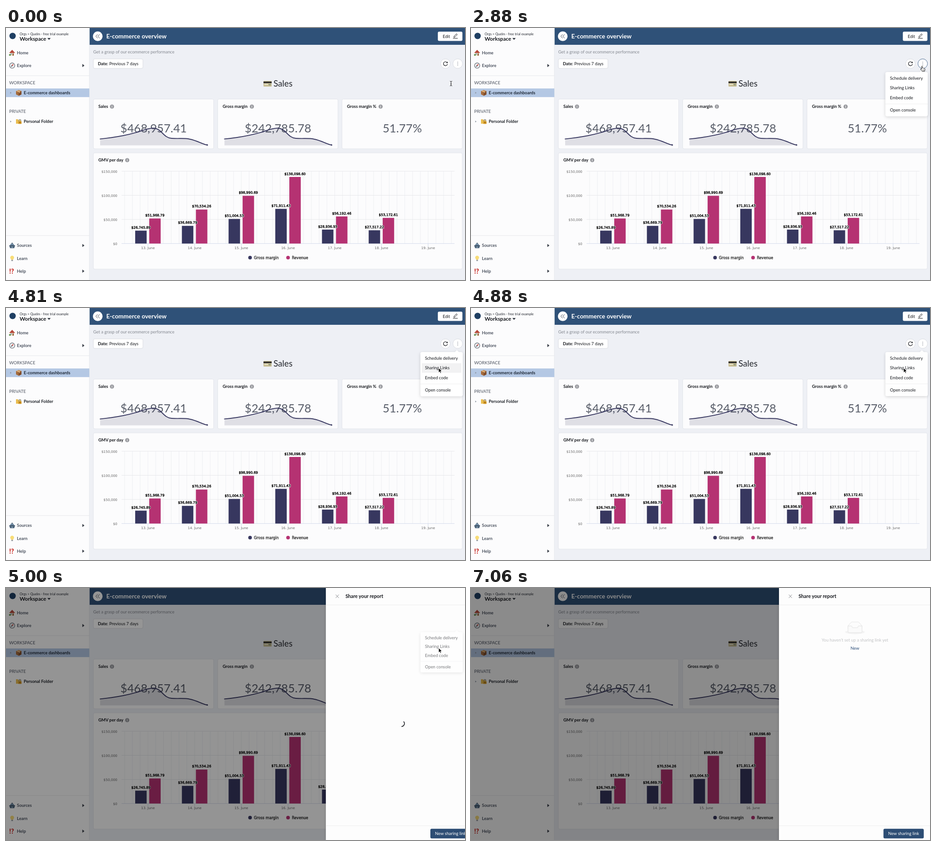
An HTML page that plays this animation: 1009x555 px, repeating every 7.12 s.

```html
<!DOCTYPE html>
<html lang="en">
<head>
<meta charset="utf-8">
<title>E-commerce overview</title>
<style>
html, body { margin: 0; width: 100%; height: 100%; overflow: hidden; background: #eef0f5; }
svg { display: block; width: 100vw; height: 100vh; font-family: Lato, sans-serif; }
.chart { font-family: "DejaVu Sans", sans-serif; }
</style>
</head>
<body>
<svg id="stage" viewBox="0 0 1009 555" preserveAspectRatio="none"></svg>
<script>
const LOOP = 7120;
const NAVY = '#37375f', PINK = '#b53272', BLUE = '#2f5178', INK = '#16181d';
const stage = document.getElementById('stage');

// ---- markup helpers ----
const rect = (x, y, w, h, fill, more = '') =>
  `<rect x="${x}" y="${y}" width="${w}" height="${h}" fill="${fill}" ${more}/>`;
const circle = (x, y, r, fill, more = '') =>
  `<circle cx="${x}" cy="${y}" r="${r}" fill="${fill}" ${more}/>`;
const path = (d, fill, more = '') => `<path d="${d}" fill="${fill}" ${more}/>`;
const line = (d, color, w = 1, more = '') =>
  `<path d="${d}" fill="none" stroke="${color}" stroke-width="${w}" ${more}/>`;
const text = (x, y, s, size = 9.38, fill = INK, more = '') =>
  `<text x="${x}" y="${y}" font-size="${size}" fill="${fill}" ${more}>${s}</text>`;
const group = (inner, more = '') => `<g ${more}>${inner}</g>`;
const BOLD = 'font-weight="700"';
const MID = 'text-anchor="middle"';
const ROUND = 'stroke-linecap="round" stroke-linejoin="round"';

const info = (x, y) => circle(x, y, 4.6, '#9a9ba0') +
  rect(x - .55, y - .8, 1.1, 3.3, '#fff') + circle(x, y - 2.1, .7, '#fff');
const caret = (x, y) => path(`M${x} ${y - 3.6}l4.6 3.6l-4.6 3.6z`, '#3d424b');
const twig = (y) => path(`M9.3 ${y - 2}l2.8 2l-2.8 2z`, '#8c939e');

// ---- sidebar ----
function sidebar() {
  const soft = '#4b525f';
  const home = path('M9 54h9v7h-9z', '#efe0c4') + path('M7 55l6.5-7l6.5 7z', '#b5483a') +
    rect(14.5, 56, 2.4, 5, '#8a5a3a') + rect(10.2, 56, 2.6, 2.4, '#6f9cc0') + circle(8.6, 59.3, 2, '#5d8f4a');
  const compass = circle(13.5, 82.7, 5.8, '#eef0f2', 'stroke="#5f666e" stroke-width="1.2"') +
    path('M17 79l-2.4 4.8l-2.2-2.2z', '#d0493e') + path('M10 86.4l2.4-4.8l2.2 2.2z', '#6a747e');
  const box = path('M22 139l6-2.6l6 2.6v7.2l-6 3l-6-3z', '#a46a3c') +
    path('M22 139l6-2.6l6 2.6l-6 2.8z', '#cf9a62') + path('M28 141.8l6-2.8v7.2l-6 3z', '#7f4c2a') +
    path('M24.6 137.9l6 2.8v2.4l-1.4-.6v-1.2l-6-2.8z', '#e5c79a');
  const lock = path('M22 201h4l1.2 1.4h5v8.4h-10.2z', '#e9bd50') +
    line('M28.4 206v-2.4a2.2 2.2 0 0 1 4.4 0v2.4', '#8b8f95', 1.2) + rect(27, 205.4, 7.2, 5.8, '#d59a28', 'rx="1"') +
    circle(30.6, 208, .9, '#604612');
  const pot = path('M7.5 480h12l-1.4 5h-9.2z', '#53697f') + path('M9 479a4.5 4.5 0 0 1 9 0z', '#6f8ca5') +
    circle(13.5, 474, 1.3, '#4d6072') + rect(7, 478.4, 13, 2.2, '#3e5267', 'rx="1"') + circle(13.5, 482.6, 1.2, '#a9cbe0');
  const bulb = circle(13.5, 505.6, 4.2, '#f7dc77') + path('M11.4 508.6h4.2v2.2h-4.2z', '#f1d27a') +
    rect(11.7, 510.8, 3.6, 2.4, '#8f959b', 'rx=".8"');
  return rect(0, 0, 183.5, 555, '#fcfcfd') + line('M183.2 0V555', '#dfe2e8', .8) +
    circle(14.5, 17.5, 7, '#1f3f63') +
    text(30, 15.6, 'Orgs &gt; Quelm - free trial example', 7.37, '#22262e') +
    text(30, 28, 'Workspace', 11.7, INK, BOLD) + path('M91 21.9h7.2l-3.6 4.4z', '#343a44') +
    home + text(24, 58.3, 'Home', 9.38, soft, BOLD) +
    compass + text(24, 86.4, 'Explore', 9.38, soft, BOLD) + caret(167.8, 82.7) +
    line('M0 105H183', '#e6e7ea') +
    text(7, 123.7, 'WORKSPACE', 9.38, soft) +
    rect(0, 133.2, 183.2, 19, '#b4c8e4') + twig(142.7) + box +
    text(39, 146, 'E-commerce dashboards', 9.38, '#1d2735', BOLD) +
    text(7, 186.9, 'PRIVATE', 9.38, soft) +
    twig(206) + lock + text(39, 209.2, 'Personal Folder', 9.38, '#1d2127', BOLD) +
    line('M0 457H183', '#e6e7ea') +
    pot + text(24, 482.4, 'Sources', 9.38, soft, BOLD) + caret(167.8, 479) +
    bulb + text(24, 510.6, 'Learn', 9.38, soft, BOLD) +
    text(7, 540.5, '!?', 14, '#c8322c', 'font-weight="900"') +
    text(24, 538.6, 'Help', 9.38, soft, BOLD) + caret(167.8, 535.5);
}

// ---- dashboard ----
const card = (x, y, w, h) => rect(x, y, w, h, '#fcfcfd', 'rx="3" stroke="#e0e3e9" stroke-width=".9"');

function kpi(x, title, infoX, value, trend) {
  const spark = 'M15 87.9C38 85.6 72 80 94 73.6C108 69.5 120 63.6 133 64C151 65.5 153 85 172 86.5C188 87.6 200 85.6 212 88.2C227 91 239 99 251 101.5';
  return card(x, 156.5, 264.5, 109.5) + text(x + 11, 176.2, title, 9.38, INK, BOLD) + info(infoX, 173) +
    text(x + 132.5, 229.6, value, 25.7, '#585d69', MID) +
    (trend ? group(path(spark + 'V102H15Z', NAVY, 'opacity=".15"') + line(spark, NAVY, 1.9, ROUND) +
      circle(250.2, 101, 1.4, NAVY), `transform="translate(${x} 156.5)"`) : '');
}

function chart() {
  const base = 474.7, day = 102.65, first = 312;
  const sales = [[26745.89, 51968.79], [36669.79, 70534.26], [51004.53, 98990.69],
    [71911.43, 138098.60], [28936.93, 56192.46], [27517.22, 53172.61]];
  const money = (v, digits) => '$' + v.toLocaleString('en-US', { minimumFractionDigits: digits });
  let grid = '', bars = '', labels = '';
  for (let i = 0; i < 43; i++) {
    const x = (first + (i - 3) * day / 6).toFixed(1);
    grid += line(`M${x} 315.5V${base}`, '#e9eaee', .7);
  }
  for (let i = 0; i < 4; i++) {
    const y = base - i * 53.1;
    grid += line(`M254 ${y}H986`, i ? '#e3e4e8' : '#c7d1e6', .8) +
      text(244.8, y + 3.2, money(i * 50000, 0), 7.37, '#666', 'text-anchor="end"');
  }
  for (let i = 0; i < 7; i++) {
    const x = first + i * day;
    grid += line(`M${x} ${base}v6.5`, '#c7d1e6', .8) + text(x, 487.4, `${13 + i}. June`, 7.37, '#666', MID);
    (sales[i] || []).forEach((v, k) => {
      const top = base - v * 159.3 / 150000, mid = x + (k ? 15.4 : -15.4);
      bars += rect(mid - 12.6, top, 25.2, base - top, k ? PINK : NAVY);
      const at = more => text(mid, top - 4.3, money(v, 2), 7.37, '#000', MID + more);
      labels += at(' stroke="#fff" stroke-width="2" stroke-linejoin="round"') + at(' stroke="#000" stroke-width=".45"');
    });
  }
  const heavy = 'stroke="#333" stroke-width=".45" letter-spacing=".1"';
  return card(192, 275, 811, 256) + text(203, 294.2, 'GMV per day', 9.38, INK, BOLD) + info(266.5, 291) +
    group(grid + bars + labels + circle(536.5, 505.8, 4, NAVY) + text(545, 508.7, 'Gross margin', 8.04, '#333', heavy) +
      circle(620, 505.8, 4, PINK) + text(628.5, 508.7, 'Revenue', 8.04, '#333', heavy), 'class="chart"');
}

function dashboard() {
  const ring = 'stroke="#d6d9df" stroke-width=".9"';
  const bank = rect(566, 116.5, 18, 12.6, '#c9bf95', 'rx="1.4"') + rect(566, 118, 18, 3.4, '#2b2a28') +
    rect(568, 123.4, 8, 1.6, '#f1eeda') + rect(577.5, 123.4, 4.5, 3, '#8f9a7d');
  return rect(183.5, 0, 825.5, 555, '#eef0f5') + rect(183.5, 0, 825.5, 37, BLUE) +
    circle(201.7, 18.2, 10.6, '#fff') + line('M201.2 14.2l-3.8 4l3.8 4M205.6 14.2l-3.8 4l3.8 4', '#3a414c', 1, ROUND) +
    text(220.4, 23, 'E-commerce overview', 13.4, '#fff', BOLD) +
    rect(949.3, 8, 54, 20.6, '#fff', 'rx="3"') + text(960, 21.5, 'Edit') +
    line('M984.6 20.2l.5-2.3l5.2-5.2l1.8 1.8l-5.2 5.2zM983 22.7h9.6', INK, 1, ROUND) +
    text(191.8, 55.6, 'Get a grasp of our ecommerce performance', 9.38, '#83878f') +
    rect(192, 68, 109, 21, '#fff', 'rx="3" ' + ring) +
    text(202, 81.8, '<tspan font-weight="700">Date</tspan>: Previous 7 days') +
    circle(966, 78.5, 10.5, '#fff', ring) +
    line('M969.7 76.2a4.4 4.4 0 1 0 .6 3.6', INK, 1.2, ROUND) + path('M970.9 73.8v3.4h-3.4z', INK) +
    circle(993, 78.5, 10.5, '#fff', `id="more" ${ring}`) +
    [-3.2, 0, 3.2].map(d => circle(993, 78.5 + d, .8, '#6d7480')).join('') +
    bank + text(588, 129.3, 'Sales', 18.76, '#24272d') +
    kpi(192, 'Sales', 233, '$468,957.41', true) +
    kpi(465.3, 'Gross margin', 540.5, '$242,785.78', true) +
    kpi(738.6, 'Gross margin %', 823.5, '51.77%', false) + chart();
}

// ---- overlays ----
function drawer() {
  const tray = '<ellipse cx="32" cy="34" rx="32" ry="7" fill="#f3f3f3"/>' +
    path('M55 13.8L44.9 2.3Q44 1 42.9 1H21.1Q20 1 19.1 2.3L9 13.8V23h46z', '#fcfcfc', 'stroke="#d9d9d9"') +
    path('M41.6 17q0-3 2.2-3H55v18q0 4-3 4H12q-3 0-3-4V14h11.2q2.2 0 2.2 3t2.2 2.9h14.8q2.2 0 2.2-2.9z', '#fafafa', 'stroke="#d9d9d9"');
  return rect(0, 0, 340, 555, '#fdfdfd', 'filter="url(#soft)"') +
    line('M21.6 14.6l7 7.4M28.6 14.6l-7 7.4', '#7b7d82', .9) +
    text(43, 22, 'Share your report', 10.72, INK, BOLD) +
    line('M0 37.3H340M0 523.7H340', '#ebebeb', .9) +
    line('M3.35 -5.8A6.7 6.7 0 0 1 3.35 5.8', INK, 1.6, 'id="spin" stroke-linecap="round"') +
    group(group(tray, 'transform="translate(145.7 74.2) scale(.67)"') +
      text(167, 118, 'You haven\'t set up a sharing link yet', 9.38, '#c3c4c6', MID) +
      text(167, 136.2, 'New', 9.38, '#2b4d78', MID), 'id="empty"') +
    rect(229.7, 530.3, 88.6, 21.2, '#2d4d74', 'id="cta" rx="3"') +
    text(274, 544.3, 'New sharing link', 9.38, '#fff', MID);
}

function menu() {
  return group(path('M986.5 97.5l4.6-4.6l4.6 4.6z', '#fff') + rect(911, 97, 93, 97.3, '#fff', 'rx="4"'), 'filter="url(#soft)"') +
    rect(914, 100.2, 87, 21, '#f2f2f3', 'id="hot0"') + rect(914, 121.6, 87, 21, '#f2f2f3', 'id="hot1"') +
    text(921, 114, 'Schedule delivery') + text(921, 135.4, 'Sharing Links') + text(921, 156.9, 'Embed code') +
    line('M911 167.3h93', '#ececee', .9) + text(921, 184.3, 'Open console');
}

const pointers = {
  beam: line('M-2.4 -5.2Q0 -5.2 0 -3.4Q0 -5.2 2.4 -5.2M0 -4V4M-2.4 5.2Q0 5.2 0 3.4Q0 5.2 2.4 5.2M-1.2 .8h2.4', '#222', 1),
  arrow: path('M0 0V10.2L2.4 8L4 11.7L5.7 11L4.1 7.4H7.4Z', '#000', 'stroke="#fff" stroke-width=".8"'),
  hand: path('M-1 1Q0 -.6 1 1V5Q2.2 4 3 5.2Q4.2 4.5 4.9 5.7Q6.3 5.2 6.5 7Q6.6 9 5.4 12H.2Q-1 9.6 -3.4 7.4Q-3.2 5.8 -1 7.2Z', '#fff', 'stroke="#111" stroke-width=".9" stroke-linejoin="round"') +
    line('M1.3 8v2.4M2.9 8v2.4M4.4 8v2.4', '#111', .6)
};

stage.innerHTML =
  '<defs><filter id="soft" x="-20%" y="-20%" width="140%" height="140%">' +
  '<feDropShadow dx="0" dy="2" stdDeviation="3.5" flood-color="#000" flood-opacity=".16"/></filter></defs>' +
  dashboard() + sidebar() + rect(0, 0, 1009, 555, '#000', 'id="mask"') +
  group(drawer(), 'id="drawer"') + group(menu(), 'id="menu"') +
  group(Object.keys(pointers).map(k => group(pointers[k], `id="${k}"`)).join(''), 'id="cursor"');

// ---- motion ----
const el = {};
stage.querySelectorAll('[id]').forEach(n => el[n.id] = n);
const set = (id, name, v) => el[id].setAttribute(name, v);
const show = (id, on) => set(id, 'visibility', on ? 'inherit' : 'hidden');
const clamp = v => Math.max(0, Math.min(1, v));
const span = (t, from, dur) => clamp((t - from) / dur);
const glide = p => p * p * (3 - 2 * p);

function bezier(x1, y1, x2, y2) {
  const at = (s, a, b) => 3 * s * (1 - s) * (1 - s) * a + 3 * s * s * (1 - s) * b + s * s * s;
  return x => {
    let lo = 0, hi = 1;
    for (let i = 0; i < 24; i++) {
      const m = (lo + hi) / 2;
      if (at(m, x1, x2) < x) lo = m; else hi = m;
    }
    return at(lo, y1, y2);
  };
}
const easeOut = bezier(.23, 1, .32, 1);
const easeIn = bezier(.755, .05, .855, .06);

// start, duration, end point
const START = [978.3, 122.3];
const MOVES = [[850, 480, 992.5, 83.5], [2400, 200, 991.5, 83.5], [3100, 600, 951, 132],
  [4960, 300, 952.5, 133.5], [6000, 250, 957, 534]];

function cursorAt(t) {
  let [x, y] = START;
  for (const [from, dur, tx, ty] of MOVES) {
    const p = glide(span(t, from, dur));
    x += (tx - x) * p;
    y += (ty - y) * p;
  }
  return [x, y];
}

function render(t) {
  const [x, y] = cursorAt(t);
  const overMore = Math.hypot(x - 993, y - 78.5) < 10.5;
  const overCta = t > 6000 && y > 530;
  const kind = overMore || overCta ? 'hand' : t < 1500 && y > 114 ? 'beam' : 'arrow';
  for (const k in pointers) show(k, k === kind);
  show('cursor', t < 7030);
  set('cursor', 'transform', `translate(${x.toFixed(2)} ${y.toFixed(2)})`);
  set('more', 'stroke', overMore ? '#3d5f8a' : '#d6d9df');

  const opened = easeOut(span(t, 2120, 200)), closed = easeIn(span(t, 4825, 200));
  const shown = opened * (1 - closed);
  show('menu', shown > .001);
  set('menu', 'opacity', shown);
  set('menu', 'transform', `translate(0 97) scale(1 ${.8 + .2 * shown}) translate(0 -97)`);
  const inMenu = x > 911 && t > 3000 && t < 4860;
  show('hot0', inMenu && y > 100 && y < 121.4);
  show('hot1', inMenu && y >= 121.4 && y < 143);

  const slide = easeOut(span(t, 4883, 300));
  set('mask', 'opacity', .45 * slide);
  show('drawer', slide > 0);
  set('drawer', 'transform', `translate(${1009 - 332 * slide} 0)`);
  const loaded = t >= 5440;
  show('spin', !loaded);
  show('empty', loaded);
  set('spin', 'transform', `translate(166 298.5) rotate(${(t - 4940) * .36})`);
}

const begin = performance.now();
function tick() {
  render((performance.now() - begin) % LOOP);
  requestAnimationFrame(tick);
}
tick();
</script>
</body>
</html>
```
